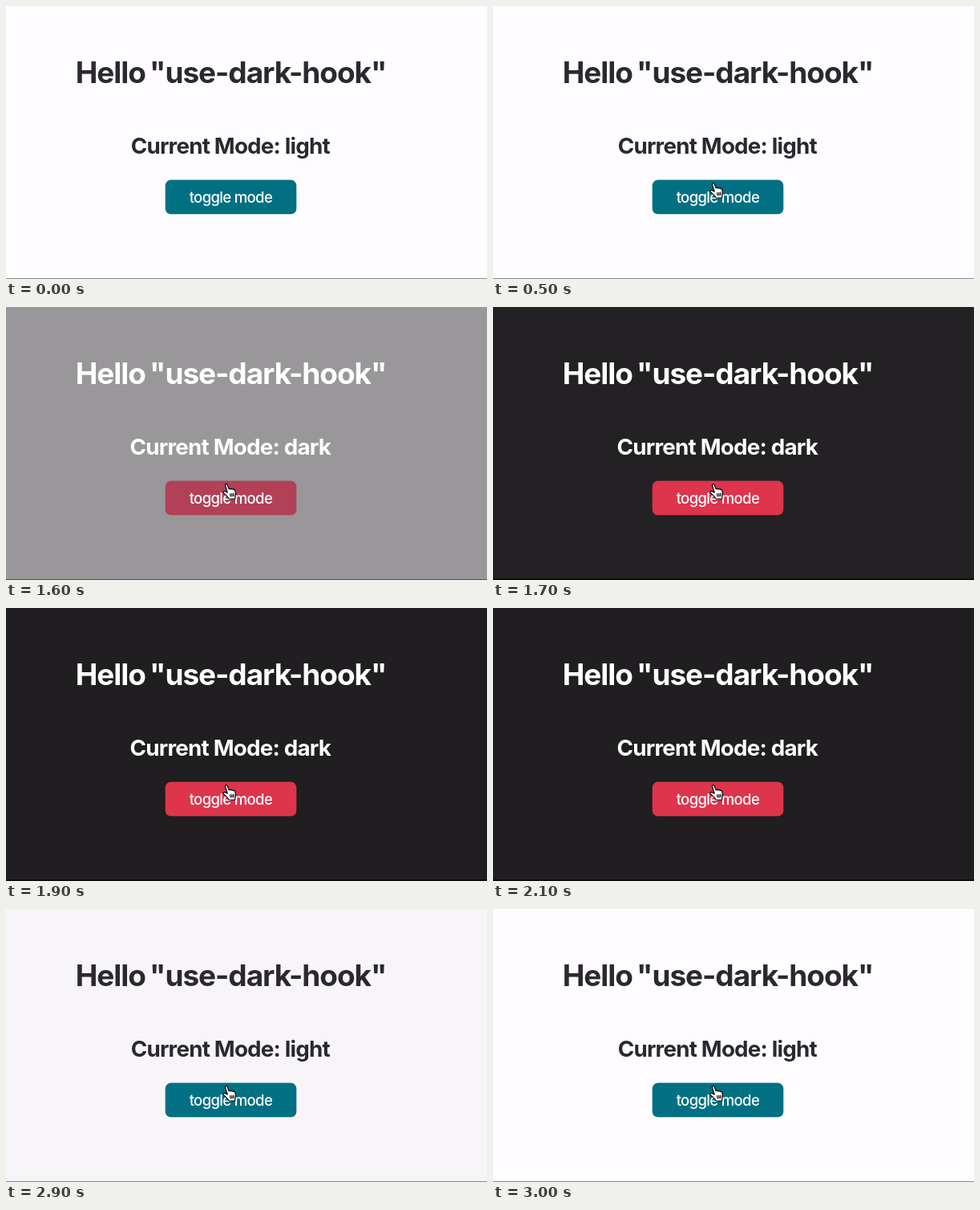
Write an HTML page that moves like this. It is 600 px wide and 340 px high and loops after 3.7 s.

```html
<!DOCTYPE html>
<html lang="en">
<head>
<meta charset="utf-8">
<title>Dark mode toggle</title>
<style>
html, body { margin: 0; width: 100%; height: 100%; overflow: hidden; }
svg { display: block; }
text { font-family: Inter, "Liberation Sans", sans-serif; text-anchor: middle; }
.head { font-weight: 700; }
#title { font-size: 37px; letter-spacing: -.028em; word-spacing: -.07em; }
#mode { font-size: 27.75px; letter-spacing: -.0285em; }
#label { font-size: 18.5px; font-weight: 500; letter-spacing: -.035em; fill: #fff; }
#cursor path { stroke: #000; stroke-width: 1.2; stroke-linejoin: round; stroke-linecap: round; fill: #fff; }
</style>
</head>
<body>
<svg width="600" height="340" viewBox="0 0 600 340">
  <rect id="page" width="600" height="340"/>
  <rect id="edge" width="600"/>
  <text id="title" class="head" x="280.5" y="96">Hello "use-dark-hook"</text>
  <text id="mode" class="head" x="279.8" y="184.2"></text>
  <rect id="button" x="198.7" y="216.6" width="163.6" height="42.6" rx="7"/>
  <text id="label" x="280.4" y="244.5">toggle mode</text>
  <g id="cursor">
    <path id="arrow" d="M.5 .5V16.5L4.2 13.2 6.6 18.8 9.2 17.7 6.8 12.2H12Z"/>
    <g id="hand">
      <path d="M3.6 3.6C2.9 1.4 5.3 .6 6.1 2.6L8.2 7.8c.5-1.1 2-.9 2.5.3.5-1 2-.8 2.5.4.7-.8 2.1-.4 2.5.9C16.6 12.4 16.8 14.5 16 17L15.6 20H8.4C7 17.5 4.5 15 1.5 12.6.2 11.1 1.7 9.7 3.4 10.6L6.2 12Z"/>
      <path d="M9.6 13.6l.6 3.2M11.7 13.4l.4 3.2M13.8 13.2l.2 3.2"/>
    </g>
  </g>
</svg>
<script>
const LOOP = 3700, STEP = 100;
const $ = id => document.getElementById(id);
const set = (id, name, value) => $(id).setAttribute(name, value);
const mix = (a, b, k) => `rgb(${a.map((v, i) => Math.round(v + (b[i] - v) * k))})`;

// Last value whose time has been reached
const held = (keys, t) => keys.filter(([at]) => at <= t).pop()[1];

const pageDark = [[0, 0], [1600, .455], [1700, .987], [1800, 1], [2800, .64], [2900, .03], [3000, 0]];
const buttonDark = [[0, 0], [1600, .8], [1700, 1], [2800, .03], [2900, 0]];
const cursorAt = [[0, null], [300, [329, 303]], [400, [284, 236]], [500, [270, 219]]];

function draw(now) {
  const t = Math.floor(now % LOOP / STEP) * STEP;
  const dark = t >= 1600 && t < 2800;
  const k = held(pageDark, t);
  const ink = dark ? "#fff" : "#2b292d";
  const height = k > .9 ? 2 : 1;

  set("page", "fill", mix([254, 252, 255], [32, 30, 32], k));
  set("edge", "fill", mix([139, 137, 139], [13, 10, 12], k));
  set("edge", "y", 340 - height);
  set("edge", "height", height);
  set("button", "fill", mix([2, 112, 131], [222, 52, 76], held(buttonDark, t)));
  set("title", "fill", ink);
  set("mode", "fill", ink);
  $("mode").textContent = "Current Mode: " + (dark ? "dark" : "light");

  const spot = held(cursorAt, t);
  set("cursor", "visibility", spot ? "visible" : "hidden");
  if (spot) {
    const overButton = spot[1] < 259;
    set("cursor", "transform", `translate(${spot})`);
    set("hand", "display", overButton ? "inline" : "none");
    set("arrow", "display", overButton ? "none" : "inline");
  }
}

function frame() {
  draw(performance.now());
  requestAnimationFrame(frame);
}
frame();
</script>
</body>
</html>
```
